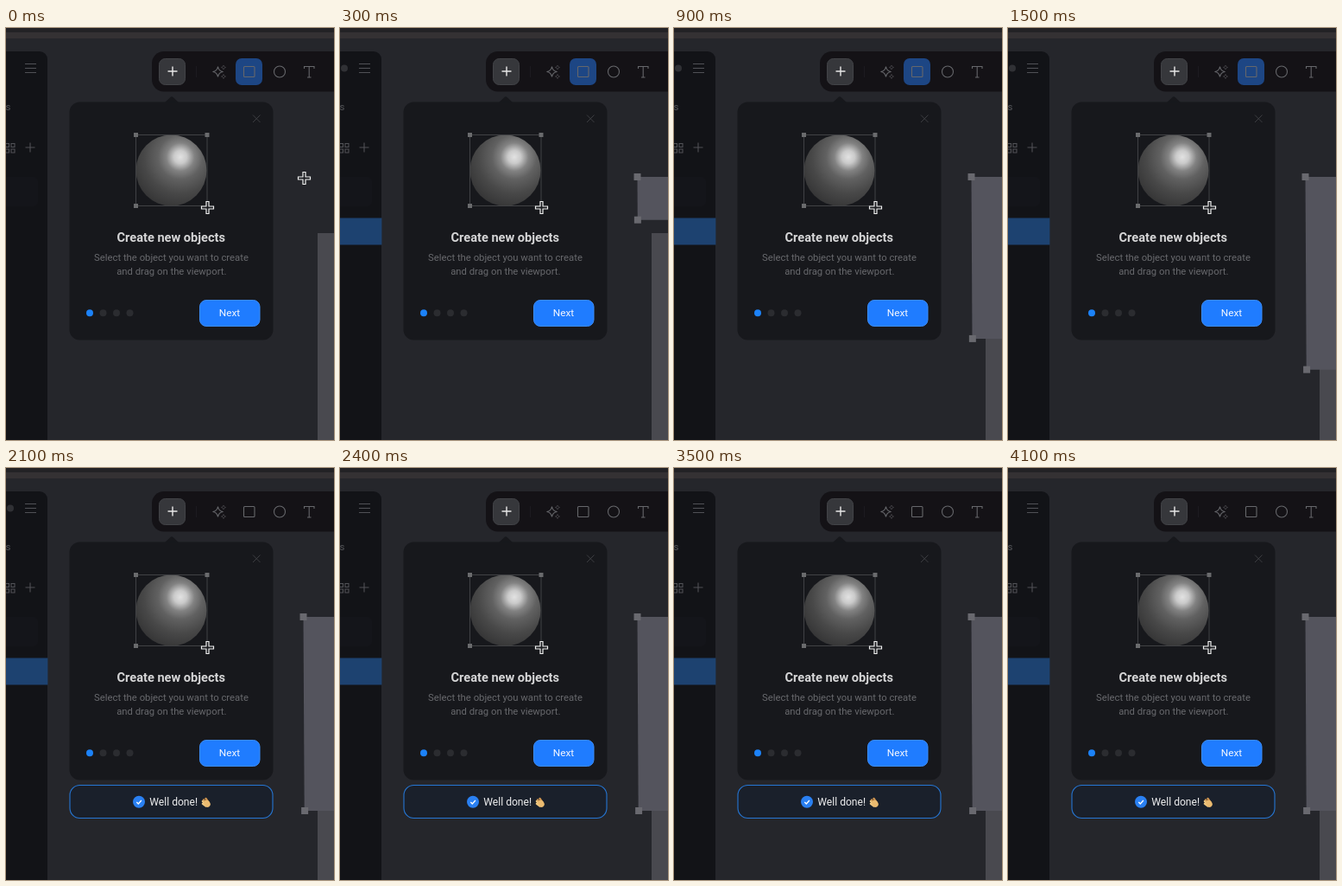
Recreate the animation shown at these times as an HTML page. Size 380x476 px, loop 4.2 s.

```html
<!DOCTYPE html>
<html lang="en">
<head>
<meta charset="utf-8">
<title>Create new objects</title>
<style>
  @property --k { syntax: "<number>"; inherits: true; initial-value: 0; }
  html, body { margin: 0; width: 100%; height: 100%; overflow: hidden; background: #25262b; }
  svg { display: block; width: 380px; height: 476px; }
  text { font-family: Roboto, Inter, sans-serif; }
  .icon { fill: none; stroke: #66676b; stroke-width: 1.1; }
  .dim { stroke: #505156; }

  .drag { animation: drag 4.2s linear infinite; }
  .shape { transform-origin: 344.5px 172px; transform: scale(var(--k)); }
  .corner { transform: translate(calc(var(--k) * 1.6px), calc(var(--k) * 224px)); }
  .pointer { transform: translate(calc(var(--k) * 240px), calc(var(--k) * 224px)); }
  .size { transform: translate(calc(var(--k) * 120px), calc(var(--k) * 224px));
          animation: size 4.2s step-end infinite; }
  .made { animation: made 4.2s step-end infinite; }
  .busy { animation: busy 4.2s step-end infinite; }
  .tool { animation: tool 4.2s step-end infinite; }
  .toast { animation: toast 4.2s ease-out infinite; }

  @keyframes drag {
    0%, 2.38% { --k: 0; }
    4.76% { --k: .07; }
    7.14% { --k: .22; }
    11.9% { --k: .55; }
    14.29% { --k: .7; }
    21.43% { --k: .834; }
    28.57% { --k: .96; }
    35.71% { --k: .994; }
    42.86%, 100% { --k: 1; }
  }
  @keyframes made { 0% { opacity: 0; } 4.7%, 100% { opacity: 1; } }
  @keyframes busy { 0% { opacity: 0; } 4.7% { opacity: 1; } 52.3%, 100% { opacity: 0; } }
  @keyframes size { 0% { opacity: 0; } 9.5%, 100% { opacity: 1; } }
  @keyframes tool { 0% { opacity: 1; } 45.2%, 100% { opacity: 0; } }
  @keyframes toast { 0%, 45.2% { opacity: 0; } 49.5%, 100% { opacity: 1; } }
</style>
</head>
<body>
<svg viewBox="0 0 380 476">
  <defs>
    <radialGradient id="ball" gradientUnits="userSpaceOnUse" cx="202" cy="149" r="68">
      <stop offset="0" stop-color="#e2e2e2"/>
      <stop offset=".11" stop-color="#cacaca"/>
      <stop offset=".24" stop-color="#828282"/>
      <stop offset=".38" stop-color="#616161"/>
      <stop offset=".62" stop-color="#484848"/>
      <stop offset="1" stop-color="#2d2d2e"/>
    </radialGradient>
    <path id="cross" d="M-1.5-7h3v5.5h5.5v3h-5.5v5.500h-3v-5.500h-5.500v-3h5.500z"
          fill="#1b1c20" stroke="#f0f0f0" stroke-width="1.2"/>
    <path id="plus" d="M-5.5 0h11M0-5.5v11"/>
    <path id="star" d="M0-6Q.8-.8 6 0Q.8.8 0 6Q-.8.8-6 0Q-.8-.8 0-6z"/>
    <rect id="knob" x="-4" y="-4" width="8" height="8" fill="#69696f"/>
    <rect id="dot" x="-2.5" y="-2.5" width="5" height="5" fill="#6a6b6d"/>
  </defs>

  <rect width="380" height="476" fill="#25262b"/>
  <rect width="380" height="5" fill="#232225"/>
  <rect y="5" width="380" height="7" fill="#343133"/>

  <!-- viewport -->
  <rect x="361" y="237" width="19" height="239" fill="#49494f"/>
  <g class="drag">
    <path class="shape" d="M344.5 172h240v224h-238.800z" fill="#54545d"/>
    <rect class="size" x="312" y="187" width="66" height="12" rx="6" fill="#3d3d43"/>
    <g class="made">
      <use href="#knob" x="344.5" y="172"/>
      <g class="corner"><use href="#knob" x="344.5" y="172"/></g>
    </g>
    <g class="pointer"><use href="#cross" x="345.5" y="173.5"/></g>
  </g>

  <!-- sidebar -->
  <path d="M0 27h39a9 9 0 0 1 9 9v440h-48z" fill="#121317"/>
  <path d="M0 172h32a5 5 0 0 1 5 5v24a5 5 0 0 1-5 5h-32z" fill="#14151a"/>
  <rect class="made" y="219.5" width="48.4" height="31" fill="#1d4270"/>
  <circle class="busy" cx="5" cy="46.5" r="4" fill="#303135"/>
  <g class="icon dim">
    <path d="M22 41.500h13M22 46.500h13M22 51.500h13"/>
    <path d="M-.5 133.500h4v4h-4zM6 133.500h4v4h-4zM-.5 140h4v4h-4zM6 140h4v4h-4z"/>
    <use href="#plus" x="28" y="138"/>
  </g>
  <text x="-.5" y="94.5" font-size="11.5" fill="#55565a">s</text>

  <!-- toolbar -->
  <rect x="169" y="27" width="230" height="46.5" rx="14" fill="#141216"/>
  <rect x="177.5" y="35.5" width="30" height="30" rx="7" fill="#36373b" stroke="#424347"/>
  <use href="#plus" x="193" y="50" stroke="#e8e8e8" stroke-width="1.4"/>
  <path d="M220.5 44v13" stroke="#1c1b20"/>
  <rect class="tool" x="266" y="35" width="31" height="31" rx="7" fill="#1d4684"/>
  <g class="icon">
    <use href="#star" x="245.5" y="50.5"/>
    <use href="#star" transform="translate(252 45.500) scale(.42)"/>
    <use href="#star" transform="translate(252 56) scale(.42)"/>
    <rect x="275.5" y="44.5" width="12.5" height="12" rx="1"/>
    <circle cx="317" cy="50.5" r="6.5"/>
    <path d="M345.500 47v-2.500h11.500v2.500M351.200 44.500v12.500M349 57h4.500"/>
  </g>

  <!-- hint card -->
  <path d="M184 86l6.500-6q1.500-1.300 3 0l6.500 6z" fill="#17181c"/>
  <rect x="73.5" y="85.5" width="236" height="275" rx="12" fill="#17181c"/>
  <path d="M286 100.500l8.500 8.500m0-8.500l-8.500 8.500" stroke="#3d3e42"/>
  <circle cx="191.5" cy="164.5" r="41" fill="url(#ball)"/>
  <rect x="150.5" y="123.5" width="82.500" height="82" fill="none" stroke="#414245"/>
  <use href="#dot" x="150.5" y="123.5"/>
  <use href="#dot" x="233" y="123.5"/>
  <use href="#dot" x="150.5" y="205.5"/>
  <use href="#cross" x="233.5" y="207.5"/>

  <g text-anchor="middle">
    <text x="191.3" y="247" font-size="14.6" font-weight="700" fill="#d6d6d7">Create new objects</text>
    <g font-size="11.3" fill="#68696d">
      <text x="191.5" y="269">Select the object you want to create</text>
      <text x="191.8" y="285">and drag on the viewport.</text>
    </g>
    <rect x="224.5" y="314.5" width="69.5" height="30" rx="7.5" fill="#1f7cff" stroke="#3c8dfb"/>
    <text x="259" y="333.3" font-size="11.8" fill="#f2f6ff">Next</text>
  </g>
  <circle cx="97" cy="329.3" r="4" fill="#1c82f8"/>
  <g fill="#2b2c30">
    <circle cx="112.5" cy="329.3" r="4"/>
    <circle cx="128" cy="329.3" r="4"/>
    <circle cx="143.5" cy="329.3" r="4"/>
  </g>

  <!-- confirmation -->
  <g class="toast">
    <rect x="74" y="366.5" width="235" height="38" rx="11.5" fill="#1a202b" stroke="#2676d4" stroke-width="1.1"/>
    <circle cx="154" cy="385.7" r="7" fill="#2a80f2"/>
    <path d="M151.300 386l2 2 3.600-4" fill="none" stroke="#fff" stroke-width="1.3"/>
    <text x="166.3" y="390" font-size="12.1" fill="#eeeeef">Well done!</text>
    <g fill="none" stroke-linecap="round">
      <path d="M233 388.500l-4-5M235 387l-3.500-5" stroke="#cf9550" stroke-width="2.4"/>
      <path d="M232 389.500l-4.200-4.500M231.500 390.500l-3.700-2.700" stroke="#f0c880" stroke-width="2.2"/>
    </g>
    <ellipse cx="233" cy="387.8" rx="3.4" ry="4.2" transform="rotate(-35 233 387.800)" fill="#ebbb70"/>
  </g>
</svg>
</body>
</html>
```
